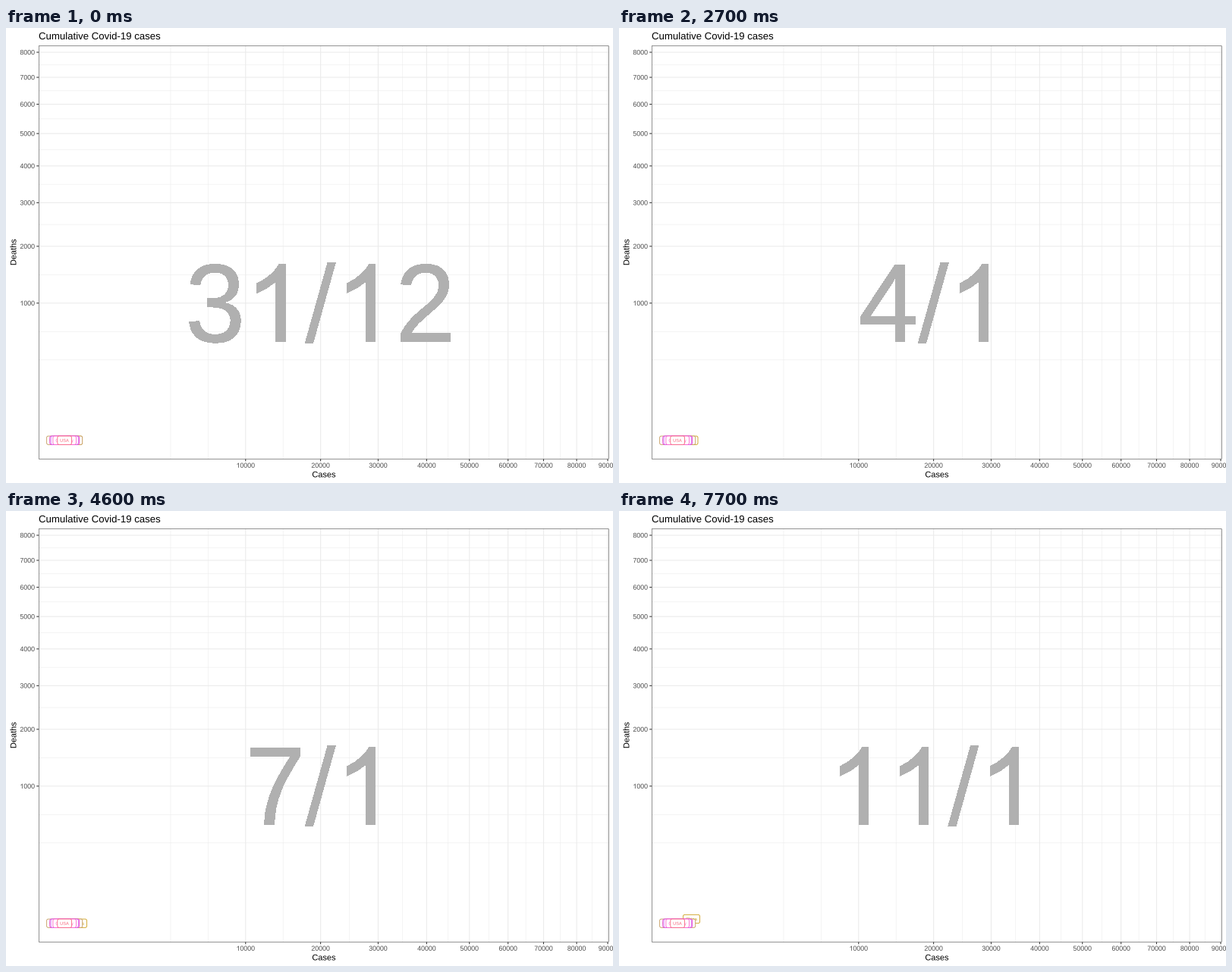
A matplotlib script for the animation above (8 s loop, 800 by 600 pixels).

```python
import numpy as np
import matplotlib.pyplot as plt
from matplotlib.animation import FuncAnimation
from matplotlib.patches import FancyBboxPatch, PathPatch, Rectangle
from matplotlib.path import Path
from matplotlib.textpath import TextPath
from matplotlib.transforms import Affine2D

W, H, DPI = 800, 600, 100
STEP, LOOP = 100, 8000
PT = 72 / DPI                       # points per pixel
EM = 2048
FONT = {"family": "Liberation Sans"}
CAP = 0.716                         # numeral height in em
LEFT, RIGHT, TOP, BOTTOM = 43, 794.5, 23.3, 568.5
MAX_CASES, MAX_DEATHS = 81968, 7505

fig = plt.figure(figsize=(W / DPI, H / DPI), dpi=DPI, facecolor="white")
ax = fig.add_axes([0, 0, 1, 1])
ax.set(xlim=(0, W), ylim=(H, 0))
ax.axis("off")


def root_scale(value, top, start, end):
    """Square root axis from 0 to top with 5 % of room at both ends."""
    share = (0.05 + np.sqrt(value / top)) / 1.1
    return start + share * (end - start)


def to_x(cases):
    return root_scale(cases, MAX_CASES, LEFT, RIGHT)


def to_y(deaths):
    return root_scale(deaths, MAX_DEATHS, BOTTOM, TOP)


def polygon(*points):
    return Path([*points, points[0]], closed=True)


# A one without a foot and a slash of numeral height, in font units.
OWN_SHAPES = {
    "1": polygon((763, 0), (583, 0), (583, 1147), (412, 1023), (223, 930),
                 (223, 1104), (365, 1182), (487, 1276), (583, 1376),
                 (647, 1472), (763, 1472)),
    "/": polygon((0, -25), (426, 1497), (571, 1497), (146, -25)),
}


def numeral(ch):
    if ch in OWN_SHAPES:
        return OWN_SHAPES[ch]
    taller = Affine2D().scale(1, 1.03)
    return taller.transform_path(TextPath((0, 0), ch, size=EM, prop=FONT))


def number_path(text, size, x, y, align=0.5):
    """Numerals with their baseline at y, aligned on x."""
    parts, pen = [], 0
    for ch in text:
        parts.append(Affine2D().translate(pen, 0).transform_path(numeral(ch)))
        pen += EM * (0.278 if ch == "/" else 0.556)
    k = size / EM
    place = Affine2D().translate(-align * pen, 0).scale(k, -k).translate(x, y)
    return place.transform_path(Path.make_compound_path(*parts))


def add_path(path, color, z=3, **style):
    return ax.add_patch(PathPatch(path, fc=color, lw=0, zorder=z, **style))


def add_text(text, size, x, y, align=0.5, turn=0):
    path = TextPath((0, 0), text, size=size, prop=FONT)
    width = path.get_extents().x1
    place = Affine2D().translate(-align * width, 0).scale(1, -1)
    add_path(place.rotate_deg(turn).translate(x, y).transform_path(path), "black")


def line(x0, y0, x1, y1, color, px):
    ax.plot([x0, x1], [y0, y1], color=color, lw=px * PT, zorder=1,
            solid_capstyle="butt", snap=False)


def with_minor(breaks):
    """Minor breaks: one extra step below, then all midpoints."""
    ext = np.r_[2 * breaks[0] - breaks[1], breaks]
    return np.r_[ext[0], (ext[1:] + ext[:-1]) / 2]


def draw_axes():
    grid, dark, grey = "#ebebeb", "#333333", "#4d4d4d"
    thin, thick, tick, size = 0.53, 1.07, 2.75, 8.8
    cases = np.arange(10000, 90001, 10000)
    deaths = np.arange(1000, 8001, 1000)
    xs, ys = to_x(cases), to_y(deaths)
    for x in with_minor(xs):
        line(x, TOP, x, BOTTOM, grid, thin)
    for y in with_minor(ys):
        line(LEFT, y, RIGHT, y, grid, thin)
    for x, n in zip(xs, cases):
        line(x, TOP, x, BOTTOM, grid, thick)
        line(x, BOTTOM, x, BOTTOM + tick, dark, thick)
        add_path(number_path(str(n), size, x, BOTTOM + 5 + CAP * size), grey)
    for y, n in zip(ys, deaths):
        line(LEFT, y, RIGHT, y, grid, thick)
        line(LEFT - tick, y, LEFT, y, dark, thick)
        add_path(number_path(str(n), size, LEFT - 5, y + CAP * size / 2, 1), grey)
    # Only the inner half of the panel border shows.
    inset = thin / 2
    ax.add_patch(Rectangle(
        (LEFT + inset, TOP + inset), RIGHT - LEFT - thin, BOTTOM - TOP - thin,
        fill=False, ec=dark, lw=thin * PT, zorder=2, snap=False))
    add_text("Cumulative Covid-19 cases", 13.2, LEFT, 15, align=0)
    add_text("Cases", 11, (LEFT + RIGHT) / 2, 592.4)
    add_text("Deaths", 11, 13.4, (TOP + BOTTOM) / 2, turn=-90)


def move(label, x, y):
    for part in label:
        part.set_transform(Affine2D().translate(x, y) + ax.transData)


def add_label(name, color):
    """Rounded label centred on the origin, to be placed with move()."""
    size, pad = 5.69, 3.7
    text = TextPath((0, 0), name, size=size, prop=FONT)
    box = text.get_extents()
    w, h = box.width + 2 * pad, CAP * size + 7.2
    centre = Affine2D().translate(-(box.x0 + box.x1) / 2, -CAP * size / 2)
    frame = FancyBboxPatch(
        (-w / 2, -h / 2), w, h, fc="white", ec=color, lw=0.85 * PT, zorder=5,
        boxstyle="round,pad=0,rounding_size=2.16", snap=False)
    ax.add_patch(frame)
    label = frame, add_path(centre.scale(1, -1).transform_path(text), color, 5)
    move(label, to_x(0), to_y(0))
    return label


def date_path(t):
    day = (t + 300) // 700
    return number_path(f"{day}/1" if day else "31/12", 142.26, 414.2, 413.7)


draw_axes()
date = add_path(date_path(0), "#b0b0b0", antialiased=False)
china = add_label("China", "#cd9f1a")
for name, color in [("United Kingdom", "#c49a5c"), ("South Korea", "#e83fd0"),
                    ("Switzerland", "#d45cf0"), ("Germany", "#ff61cc"),
                    ("USA", "#f8667d")]:
    add_label(name, color)


def update(i):
    t = i * STEP
    date.set_path(date_path(t))
    root = np.interp(t, [1400, 2100, 2800, 3500], np.sqrt([27, 44, 44, 59]))
    rise = np.interp(t, [7000, 7700], [0, 1])
    move(china, to_x(root ** 2), to_y(rise ** 2))
    return [date, *china]


anim = FuncAnimation(fig, update, frames=LOOP // STEP, interval=STEP,
                     repeat=True, repeat_delay=0, blit=False)
plt.show()
```
